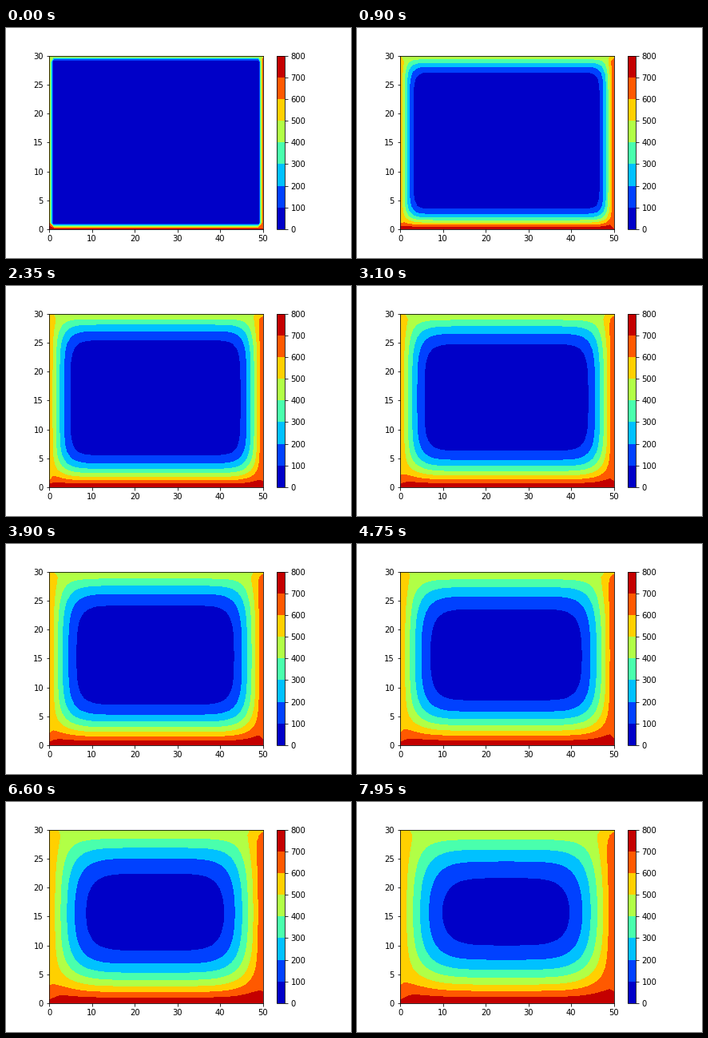
Recreate the animation shown at these times as a matplotlib script. Size 432 by 288 pixels, loop 8000 ms.

```python
import numpy as np
import matplotlib.pyplot as plt
from matplotlib.animation import FuncAnimation

FRAMES, INTERVAL = 160, 50
NX, NY = 50, 30
RATE = 0.13  # diffusivity * dt / dx^2
LEFT, BOTTOM, RIGHT, TOP = 600, 800, 700, 500
LEVELS = np.arange(0, 801, 100)


def heated_plate():
    """Cold plate with four edges held at fixed temperatures."""
    u = np.zeros((NY + 1, NX + 1))
    u[:, 0] = LEFT
    u[0, :] = BOTTOM
    u[:, -1] = RIGHT
    u[-1, :] = TOP
    return u


def diffuse(u):
    """One explicit step of the 2D heat equation."""
    new = u.copy()
    mid = u[1:-1, 1:-1]
    around = u[:-2, 1:-1] + u[2:, 1:-1] + u[1:-1, :-2] + u[1:-1, 2:]
    new[1:-1, 1:-1] = mid + RATE * (around - 4 * mid)
    return new


states = [heated_plate()]
while len(states) < FRAMES:
    states.append(diffuse(states[-1]))

plt.rcParams.update({
    "font.family": "DejaVu Sans",
    "font.size": 10,
    "figure.subplot.left": 0.125,
    "figure.subplot.right": 0.9,
    "figure.subplot.bottom": 0.125,
    "figure.subplot.top": 0.88,
})
fig, ax = plt.subplots(figsize=(6, 4), dpi=72)


def fill(u):
    return ax.contourf(u, levels=LEVELS, cmap="jet")


plot = fill(states[0])
fig.colorbar(plot, ax=ax)


def draw(i):
    global plot
    plot.remove()
    plot = fill(states[i])
    return [plot]


anim = FuncAnimation(fig, draw, frames=FRAMES, interval=INTERVAL,
                     init_func=lambda: [], repeat=True, repeat_delay=0,
                     blit=False)
plt.show()
```
